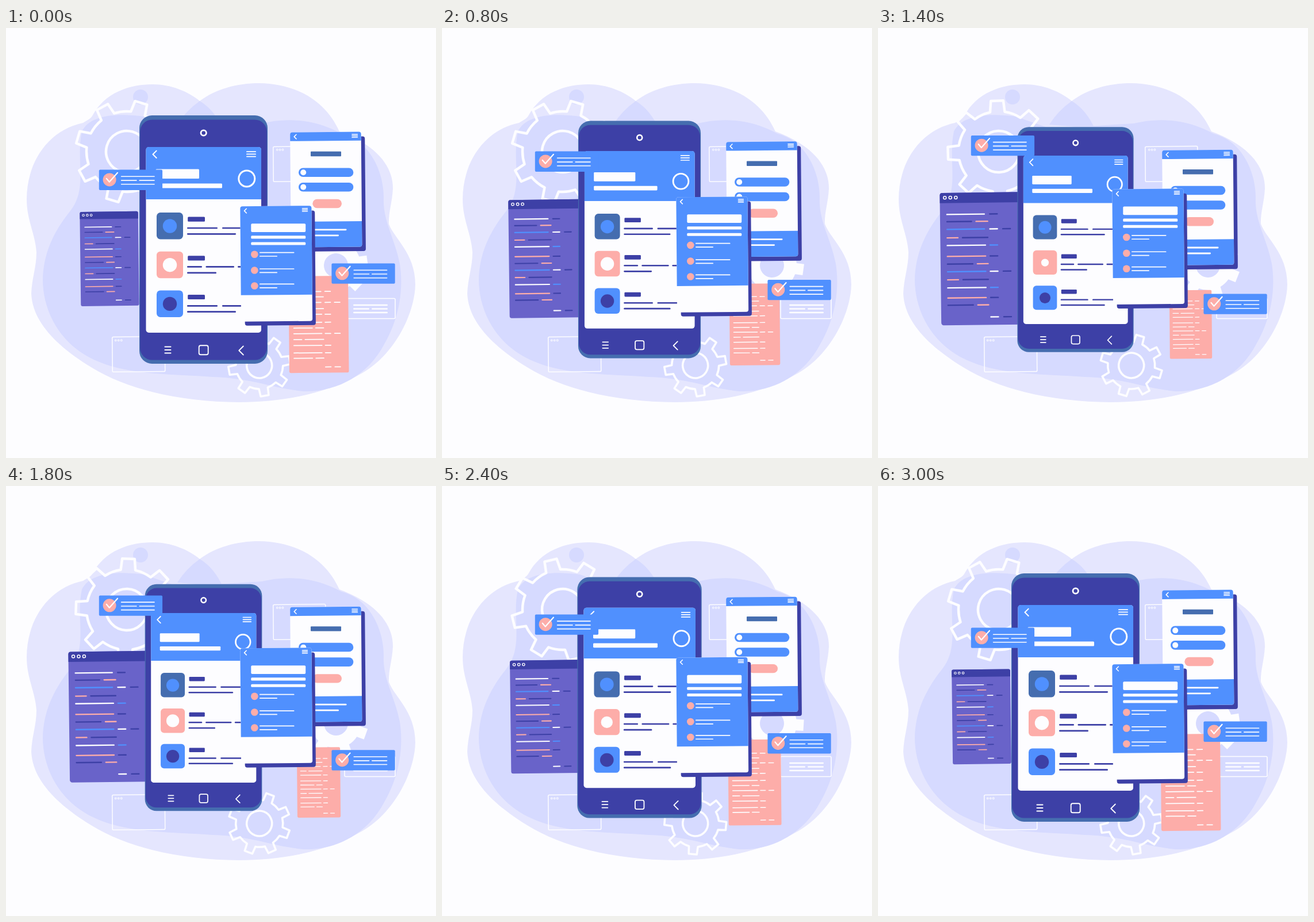
An HTML page for the animation above (3.05 s loop, 748 by 748 pixels).

```html
<!DOCTYPE html>
<html lang="en">
<head>
<meta charset="utf-8">
<title>App screens</title>
<style>
  html, body { margin: 0; width: 100%; height: 100%; overflow: hidden; background: #fdfdff; }
  svg { display: block; width: 100vw; height: 100vh; }
</style>
</head>
<body>
<svg id="stage" viewBox="0 0 748 748"></svg>
<script>
const LOOP = 3050, STEP = 50;
const WHITE = '#fdfdff', NAVY = '#3d40a6', STEEL = '#456daf', BLUE = '#5090fe',
      PINK = '#fdada9', PURPLE = '#6963c9', OUTER = '#e5e6fe', INNER = '#d6daff';

// Drawing helpers, all working with edge coordinates
const rect = (x1, y1, x2, y2, fill, r = 0) =>
  `<rect x="${x1}" y="${y1}" width="${x2 - x1}" height="${y2 - y1}" rx="${r}" fill="${fill}"/>`;
const frame = (x1, y1, x2, y2, w, r) =>
  `<rect x="${x1}" y="${y1}" width="${x2 - x1}" height="${y2 - y1}" rx="${r}" fill="none" stroke="${WHITE}" stroke-width="${w}"/>`;
const disc = (x, y, r, fill, id = '') => `<circle ${id && `id="${id}"`} cx="${x}" cy="${y}" r="${r}" fill="${fill}"/>`;
const ring = (x, y, r, w) => `<circle cx="${x}" cy="${y}" r="${r}" fill="none" stroke="${WHITE}" stroke-width="${w}"/>`;
const path = (d, fill) => `<path d="${d}" fill="${fill}"/>`;
const stroke = (d, w, color = WHITE) =>
  `<path d="${d}" fill="none" stroke="${color}" stroke-width="${w}" stroke-linecap="round" stroke-linejoin="round"/>`;
const line = (x1, x2, y, w, color) => stroke(`M${x1 + w / 2} ${y}H${x2 - w / 2}`, w, color);
const bars = (x1, x2, y, gap, w) => [0, 1, 2].map(i => line(x1, x2, y + i * gap, w)).join('');
const chevron = (x, y, s, w) => stroke(`M${x + s} ${y - s}L${x} ${y}L${x + s} ${y + s}`, w);
const dots = (x, y, gap, r, w) => [0, 1, 2].map(i => ring(x + i * gap, y, r, w)).join('');
const group = (id, body) => `<g id="${id}">${body}</g>`;
const turned = (deg, x, y, body) => `<g transform="rotate(${deg} ${x} ${y})">${body}</g>`;

function gearPath(teeth, outer, body, tip, base) {
  const at = (r, deg) => {
    const a = deg * Math.PI / 180;
    return `${(r * Math.sin(a)).toFixed(2)} ${(-r * Math.cos(a)).toFixed(2)}`;
  };
  let d = '';
  for (let i = 0; i < teeth; i++) {
    const a = i * 360 / teeth;
    d += `${i ? `A${body} ${body} 0 0 1 ` : 'M'}${at(body, a - base)}` +
         `L${at(outer, a - tip)}L${at(outer, a + tip)}L${at(body, a + base)}`;
  }
  return d + `A${body} ${body} 0 0 1 ${at(body, -base)}Z`;
}

// One letter per dash: colour key, start, end
const CODE = [
  [346, 'w137-185 n190-201'], [355, 'n137-169 p173-189'],
  [364.5, 'b137-185 w190-201 n206-217'], [375, 'p137-152 n156-189'],
  [384.5, 'w137-186 b190-201'], [398, 'p137-186 n190-201'],
  [407.5, 'n137-170 p174-189'], [417, 'b137-186 w190-201 n206-217'],
  [427, 'p137-152 n156-189'], [437, 'w137-186 b190-201'],
  [449.5, 'p137-186 n190-201'], [458.5, 'n137-170 p174-189'],
  [473.5, 'w190-201 n206-217']
];
const INK = { w: WHITE, n: NAVY, p: PINK, b: BLUE };
const code = plain => CODE.map(([y, row]) => row.split(' ').map(s => {
  const [a, b] = s.slice(1).split('-').map(Number);
  return line(a, b, y, 1.7, plain ? WHITE : INK[s[0]]);
}).join('')).join('');

function backdrop() {
  return path('M36 298C36 235 72 178 134 165C142 160 147 158 150 153C172 112 215 98 255 98' +
      'C287 98 316 110 337 127C365 106 402 96 440 96C500 97 554 122 580 180C642 203 673 238 673 279' +
      'C672 303 665 321 666 341C675 366 712 392 712 446C711 500 673 570 620 600' +
      'C556 637 480 651 405 651C310 650 216 632 148 590C86 552 46 510 44 462' +
      'C45 435 53 416 53 390C51 358 36 334 36 298Z', OUTER) +
    path('M132 180C145 152 190 147 240 154L300 175L445 166C485 156 535 157 584 184' +
      'C633 196 657 250 657 295C655 335 676 365 685 410C692 455 684 505 658 550' +
      'C630 604 575 634 517 632C460 626 428 609 360 607C290 602 215 604 160 580' +
      'C92 552 64 490 64 438C65 393 82 355 112 318C143 278 121 230 132 180Z', INNER) +
    path('M298 168Q313 144 337 127Q362 142 377 175Z', INNER) +
    disc(234, 120, 13, INNER);
}

function gears() {
  return group('gearA', stroke(gearPath(8, 89, 70, 7, 10.5), 4.5) + ring(0, 0, 36, 4.5)) +
    group('gearB', stroke(gearPath(8, 54, 41, 7.5, 11), 3.6) + ring(0, 0, 22, 3.6)) +
    group('gearC', path(gearPath(7, 56, 43, 10, 13), WHITE) + disc(0, 0, 21, INNER));
}

function outlines() {
  return turned(-0.5, 510, 236, frame(465, 206, 556, 267, 1.5, 2) + dots(472, 211.5, 4.8, 1.4, 1)) +
    turned(-0.5, 230, 567, frame(185, 537, 276.5, 598, 1.5, 2) + dots(191, 543, 5, 1.4, 1)) +
    frame(589, 470.5, 677, 505.5, 1.6, 2) +
    line(604, 664, 482, 2.6) + line(604, 632, 488.5, 2.6) + line(636, 664, 488.5, 2.6) + line(604, 664, 495, 2.6);
}

function phone() {
  const rows = [[321, STEEL, BLUE, 'dotA'], [388.7, PINK, WHITE, 'dotB'], [456.4, BLUE, NAVY, 'dotC']];
  return rect(232, 152, 455, 584, STEEL, 22) + rect(233.2, 159.5, 453.8, 577.5, NAVY, 21) +
    ring(343.7, 182.5, 4.7, 2.8) +
    rect(243.5, 207, 444, 530, WHITE, 5) +
    path('M243.5 298V212Q243.5 207 248.5 207H439Q444 207 444 212V298Z', BLUE) +
    chevron(255.5, 219.8, 6.2, 2) + bars(418, 435, 215.2, 4.2, 1.8) +
    rect(260.5, 245.5, 336, 262, WHITE, 1.5) + rect(260.5, 270.5, 376, 278.5, WHITE, 1.5) +
    ring(418.8, 262, 14, 3) +
    rows.map(([y, box, dot, id], i) =>
      rect(262, y, 308, y + 46.5, box, 6.5) + disc(285, y + 23.5, 12.2, dot, id) +
      rect(316.2, y + 7.5, 346, y + 15.7, NAVY, 1.5) +
      (i === 1
        ? line(315, 341, y + 26.7, 2.7, NAVY) + line(347.5, 397, y + 26.7, 2.7, NAVY) +
          line(403, 425, y + 26.7, 2.7, NAVY) + line(315, 366, y + 37.2, 2.7, NAVY)
        : line(315, 368, y + 27, 2.7, NAVY) + line(376, 425, y + 27, 2.7, NAVY) +
          line(315, 400, y + 37.3, 2.7, NAVY))).join('') +
    bars(275.5, 287.5, 554.5, 5.5, 1.8) + frame(335.7, 552.2, 351.7, 568.2, 1.9, 3) +
    chevron(405.3, 561, 7.5, 1.9);
}

function codeWindow() {
  return turned(-0.7, 180, 401.3, rect(129.3, 319.3, 230.7, 483.3, PURPLE, 3) +
    path('M129.3 332V322.3Q129.3 319.3 132.3 319.3H227.7Q230.7 319.3 230.7 322.3V332Z', NAVY) +
    dots(135.5, 325.2, 6.8, 1.8, 1.1) + code(false));
}

function coralPanel() {
  return turned(-0.5, 544, 515.5, rect(492.2, 431.5, 595.8, 599.8, PINK, 3) +
    `<g transform="translate(544 515.5) scale(1.03) translate(-180 -401.5)">${code(true)}</g>`);
}

function loginCard() {
  return turned(-0.5, 557, 281, rect(502, 189, 625, 388.5, NAVY, 4) +
    rect(495, 181, 618.5, 381, WHITE, 4) +
    path('M495 196.3V185Q495 181 499 181H614.5Q618.5 181 618.5 185V196.3Z', BLUE) +
    path('M495 336.5H618.5V377Q618.5 381 614.5 381H499Q495 381 495 377Z', BLUE) +
    chevron(502, 188.6, 3.8, 1.6) + bars(602, 613, 185.4, 2.6, 1.5)) +
    rect(530, 214.8, 583, 223.2, STEEL, 1) +
    rect(509, 243.5, 604.3, 259, BLUE, 7.7) + disc(517.2, 251.3, 5, WHITE) +
    rect(509, 269, 604.3, 284.6, BLUE, 7.7) + disc(517.2, 276.8, 5, WHITE) +
    rect(533.3, 297.8, 584, 313.2, PINK, 7.7) +
    line(524, 592.5, 350.8, 2.8) + line(524, 579, 360.8, 2.8);
}

function listCard() {
  const rows = [[393.8, 393.8], [421.5, 422.2], [448.5, 448.6]];
  return turned(-0.5, 470.5, 410, rect(414.8, 318, 538, 517.3, NAVY, 4) +
    rect(408.2, 309.7, 532.3, 510.2, WHITE, 4) +
    path('M408.2 464.3V313.7Q408.2 309.7 412.2 309.7H528.3Q532.3 309.7 532.3 313.7V464.3Z', BLUE) +
    chevron(415.3, 317.6, 3.8, 1.6) + bars(515.5, 526, 314.3, 2.5, 1.5)) +
    rect(426.3, 340.3, 521.2, 355, WHITE, 2) +
    rect(426.3, 361.2, 521.2, 366.4, WHITE, 1.5) + rect(426.3, 372.6, 521.2, 377.6, WHITE, 1.5) +
    rows.map(([dot, text]) => disc(432.3, dot, 6.3, PINK) +
      line(441, 501.5, text - 3.2, 1.7) + line(441, 472, text + 3.2, 1.7)).join('');
}

function notice(x, y) {
  return `<g transform="translate(${x} ${y})">` + rect(0, 0, 110.3, 35.3, BLUE, 2) + disc(18.3, 17.3, 11.5, PINK) +
    stroke('M13 15.3L18 21.2L32.2 5.2', 2.2) +
    line(38, 97, 11.7, 1.6) + line(38, 66, 18.5, 1.6) + line(69.5, 97, 18.5, 1.6) + line(38, 97, 25.2, 1.6) + '</g>';
}

const $ = id => document.getElementById(id);
$('stage').innerHTML = backdrop() + gears() + outlines() +
  group('codeWindow', codeWindow()) + group('phone', phone()) +
  group('coral', coralPanel()) + group('login', loginCard()) + group('list', listCard()) +
  group('noticeL', notice(161.8, 246.6)) + group('noticeR', notice(566.4, 409.5));

const move = (id, value) => $(id).setAttribute('transform', value);
const shift = (id, dy) => move(id, `translate(0 ${dy})`);
const zoom = (id, x, y, s) => move(id, `translate(${x} ${y}) scale(${s}) translate(${-x} ${-y})`);
const spin = (id, x, y, deg) => move(id, `translate(${x} ${y}) rotate(${deg})`);

// Times at which each list dot is smallest
const DIPS = { dotA: [1070, 2200], dotB: [280, 1400, 2520], dotC: [400, 1520] };
const dip = (t, times) => times.reduce((s, at) => {
  const k = Math.min(1, Math.abs(t - at) / 200);
  return s - 0.2 * (1 + Math.cos(Math.PI * k));
}, 1);

function pose(t) {
  const phase = Math.min(1, Math.max(0, (t - 20) / 3020));
  const p = Math.sin(Math.PI * phase) ** 2;
  const turn = 360 * Math.min(1, t / 3000) ** 1.05;
  zoom('phone', 343.7, 368.2, 1 - 0.0955 * p ** 1.2);
  zoom('codeWindow', 180, 401.3, 1 + 0.41 * p ** 0.75);
  zoom('coral', 544, 515.5, 1 - 0.297 * p);
  shift('login', 31.8 * p);
  shift('list', -30.3 * p);
  shift('noticeL', -60.8 * p);
  shift('noticeR', 54 * p);
  spin('gearA', 210, 215, 16.4 + turn);
  spin('gearB', 440.7, 587, 35 + turn);
  spin('gearC', 574, 413, 82 + 30 * p);
  for (const id in DIPS) $(id).setAttribute('r', 12.2 * dip(t, DIPS[id]));
}

const start = performance.now();
function tick() {
  const t = (performance.now() - start) % LOOP;
  pose(Math.floor(t / STEP) * STEP);
  requestAnimationFrame(tick);
}
tick();
</script>
</body>
</html>
```
